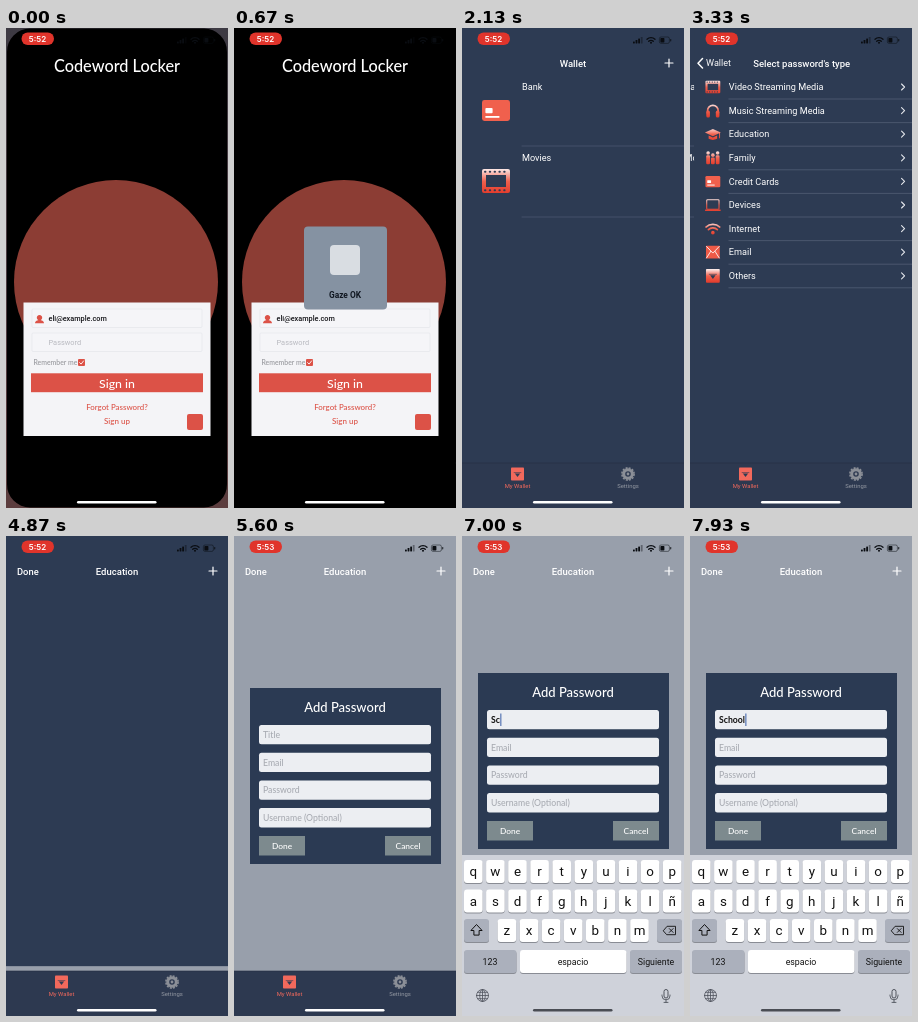
Animation of 222x480 px, one loop 8000 ms. Source, as an HTML page:

```html
<!DOCTYPE html>
<html lang="en">
<head>
<meta charset="utf-8">
<title>Codeword Locker</title>
<style>
html,body{margin:0;width:100%;height:100%;overflow:hidden;background:#000}
svg{display:block;width:100vw;height:100vh}
text{font-family:Roboto,sans-serif;font-size:9.15px;fill:#fff;white-space:pre}
.hand{font-family:Lato,sans-serif;font-weight:500}
.mid{text-anchor:middle}
.bold{font-weight:500}
</style>
</head>
<body>
<svg id="stage" viewBox="0 0 222 480" preserveAspectRatio="none"></svg>
<script>
const W = 222, H = 480, LOOP = 8000;
const NAVY = '#2d3b53', RED = '#dc5247', CORAL = '#f2695c';

// ---- markup helpers ----
const rect = (x, y, w, h, fill, r = 0, more = '') =>
  `<rect x="${x}" y="${y}" width="${w}" height="${h}" rx="${r}" fill="${fill}" ${more}/>`;
const text = (x, y, s, cls = '', style = '', id = '') =>
  `<text x="${x}" y="${y}" class="${cls}" style="${style}" ${id && `id="${id}"`}>${s}</text>`;
const line = (d, color, w = 1, more = '') =>
  `<path d="${d}" fill="none" stroke="${color}" stroke-width="${w}" stroke-linecap="round" stroke-linejoin="round" ${more}/>`;
const fill = (d, color) => `<path d="${d}" fill="${color}"/>`;
const group = (id, body, more = '') => `<g id="${id}" ${more}>${body}</g>`;
const at = (x, y, body, s = 1) => `<g transform="translate(${x} ${y}) scale(${s})">${body}</g>`;

// ---- icons, centred on 0,0 ----
const G = 'url(#warm)';
const walletIcon = c => rect(-6.5, -6.5, 13, 13, c, .8) +
  fill('M-2.6-.6h5.2L0 3Z', NAVY) + line('M-3.4-1.4h6.8', NAVY, .6);
const icons = {
  film: rect(-7, -6, 14, 12, G, 1) + rect(-5, -3, 10, 6, NAVY) +
    line('M-5.5-4.6h11M-5.5 4.6h11', NAVY, 1, 'stroke-dasharray=".2 2.2"'),
  phones: line('M-5 3v-3a5 5 0 0 1 10 0v3', G, 1.6) + rect(-6.2, 0, 3.4, 6.5, G, 1.5) + rect(2.8, 0, 3.4, 6.5, G, 1.5),
  cap: fill('M0-5 7.5-1.5 0 2-7.5-1.5Z', G) + fill('M-4 1.2 0 3 4 1.2V4.4Q0 6.6-4 4.4Z', G) + line('M6.3-1v4.5', G, .9),
  family: [-4.5, 0, 4.5].map((x, i) =>
    `<circle cx="${x}" cy="${i == 1 ? -2.5 : -4.5}" r="1.7" fill="${G}"/>` +
    rect(x - 1.8, i == 1 ? -.4 : -2.4, 3.6, i == 1 ? 6.6 : 8.6, G, 1.2)).join(''),
  card: rect(-7, -5, 14, 10.5, '#f0604d', 1.2) + rect(-5.3, -1, 3.6, 2.6, '#fff', .5) + rect(-5.3, 3, 7, .9, '#fff'),
  laptop: rect(-5.8, -5, 11.6, 9, 'none', .8, `stroke="${G}" stroke-width="1"`) + rect(-7.5, 4.2, 15, 1.5, G, .7),
  wifi: line('M-6.5-1.5a9.5 9.5 0 0 1 13 0M-4.2 1a6 6 0 0 1 8.4 0', G, 1.6) + `<circle cy="3.8" r="1.7" fill="${G}"/>`,
  mail: rect(-6.5, -6, 13, 12, '#ee5a47', .6) + line('M-6-5.4 0 .8 6-5.4M-6 5.4-2-.8M6 5.4 2-.8', '#fff', .8),
  wallet: walletIcon(G)
};
const cog = `<circle r="4.3" fill="none" stroke="#8b8f97" stroke-width="3"/><circle r="6.1" fill="none" stroke="#8b8f97" stroke-width="1.6" stroke-dasharray="2 1.19"/><circle r="1.4" fill="#8b8f97"/>`;
const plus = line('M203 35h8M207 31v8', '#fff', 1.2);

// ---- login page ----
const login = rect(0, 0, W, H, '#000') +
  text(111, 44, 'Codeword Locker', 'hand mid', 'font-size:16.3px') +
  '<circle cx="110" cy="254" r="102" fill="#8c3d34"/>' +
  rect(17.5, 274.5, 187, 133.5, '#f4f4f7') +
  [281, 305].map(y => rect(26, y, 170, 18.5, '#f5f5f8', 1, 'stroke="#e3e4ea" stroke-width=".6"')).join('') +
  at(33.5, 291, fill('M-4.5 4.2Q-4.3 1.6-1.2 1.2A2.7 2.7 0 1 1 1.2 1.2Q4.3 1.6 4.5 4.2Z', RED)) +
  text(42.5, 293, 'eli@example.com', 'bold', 'font-size:7.3px;fill:#16161a') +
  text(42.5, 317, 'Password', '', 'font-size:7.4px;fill:#b9bac0') +
  text(27.5, 337.3, 'Remember me', 'hand', 'font-size:6.9px;fill:#96979c') +
  rect(72, 331, 7, 7, RED, 1) + line('M73.6 334.6l1.5 1.5 2.5-3.2', '#fff', .9) +
  rect(25, 345.3, 172, 18.9, RED) +
  text(111, 359.5, 'Sign in', 'hand mid', 'font-size:12.3px') +
  text(111, 381.8, 'Forgot Password?', 'hand mid', `font-size:7.9px;fill:${RED}`) +
  text(111, 396.3, 'Sign up', 'hand mid', `font-size:8px;fill:${RED}`) +
  rect(181, 386, 16, 16, RED, 2);

// ---- wallet, type list and education pages ----
const page = rect(0, 0, W, H, NAVY);
const saved = [['card', 'Bank', 47], ['film', 'Movies', 118]];
const wallet = page + group('saved', saved.map(([k, s, y]) =>
  at(34, y + 35, icons[k], 2) + text(60, y + 15.3, s) + line(`M60 ${y + 71}H222`, '#53607a', .6)).join(''));

const types = [['film', 'Video Streaming Media'], ['phones', 'Music Streaming Media'], ['cap', 'Education'],
  ['family', 'Family'], ['card', 'Credit Cards'], ['laptop', 'Devices'], ['wifi', 'Internet'], ['mail', 'Email'], ['wallet', 'Others']];
const typeList = page + types.map(([k, s], i) => {
  const y = 59 + i * 23.6;
  return at(18.8, y, icons[k], 1.06) + text(34.8, y + 3.2, s) +
    line(`M207.5 ${y - 3}l3 3-3 3`, '#e4e7ec', 1.1) + line(`M34.8 ${y + 12}H222`, '#5d6980', .6);
}).join('');

// ---- add-password dialog ----
const fields = ['Title', 'Email', 'Password', 'Username (Optional)'];
const button = (x, s) => rect(x, 300, 46, 19.5, '#7d8a8e') + text(x + 23, 313, s, 'hand mid', 'font-size:8.4px');
const dialog = rect(16, 152, 191, 176, '#2b3a53') +
  text(111, 176.3, 'Add Password', 'hand mid', 'font-size:13px') +
  fields.map((s, i) => {
    const y = 189 + i * 27.7;
    return rect(25, y, 172, 19.3, '#eceef2', 2.5) +
      text(29, y + 12.9, s, 'hand', 'font-size:8.7px;fill:#a9acb3', i ? '' : 'hint');
  }).join('') +
  text(29, 201.9, '', 'hand', 'font-size:8.7px;font-weight:700;fill:#111', 'typed') +
  rect(29, 192.5, 1, 12.5, '#3b5fa8', 0, 'id="caret"') + button(25, 'Done') + button(151, 'Cancel');

// ---- navigation and tab bars ----
const title = (s, x = 111) => text(x, 38.5, s, 'mid bold', 'font-size:9.5px');
const navs =
  group('navWallet', title('Wallet') + plus) +
  group('navTypes', group('typesTitle', title("Select password's type", 110)) +
    line('M12.5 30.5 8 35.2l4.5 4.7', '#fff', 1.5) + text(16, 38.4, 'Wallet', '', 'font-size:9.1px')) +
  group('navEdu', group('eduTitle', title('Education')) + text(11, 38.5, 'Done', 'bold', 'font-size:9.4px') + plus);
const tabs = rect(0, 435, W, 45, '#2d3950') + line('M0 435H222', '#222d40', .6) +
  at(55.5, 446, walletIcon(CORAL)) + at(166, 446, cog) +
  text(55.5, 460, 'My Wallet', 'mid', `font-size:5.9px;fill:${CORAL}`) +
  text(166, 460, 'Settings', 'mid', 'font-size:5.9px;fill:#959aa3');

// ---- keyboard, drawn with its top at 0 ----
const key = (x, y, w, c, more = '') => rect(x, y + 1, w, 23, '#898c94', 3) + rect(x, y, w, 23, c, 3, more);
const rows = [['QWERTYUIOP', 2, 5], ['ASDFGHJKLÑ', 2, 34.5], ['ZXCVBNM', 35.6, 64]];
const GREY = '#abb0bc';
const keyboard = rect(0, 0, W, 161, '#cfd2da') +
  rows.map(([s, x, y]) => [...s].map((c, i) =>
    key(x + i * 22.1, y, 18.6, '#fff') +
    text(x + 9.3 + i * 22.1, y + 16.4, c, 'mid letter', 'font-size:13.4px;fill:#111')).join('')).join('') +
  key(2, 64, 25, GREY, 'id="shiftKey"') +
  '<path id="shift" d="M14.5 69.5l5.6 6h-3v4.6h-5.2v-4.6h-3Z" stroke="#111" stroke-width="1" stroke-linejoin="round"/>' +
  key(195, 64, 25, GREY) + line('M201.5 75.5l3.6-4.2h8.4v8.4h-8.4ZM207.3 73.6l3.8 3.8M211.1 73.6l-3.8 3.8', '#111', .9) +
  key(2, 95, 52.5, GREY) + key(58, 95, 106.5, '#fff') + key(168, 95, 52, GREY) +
  text(28, 109.6, '123', 'mid', 'font-size:8.8px;fill:#111') +
  text(111, 109.6, 'espacio', 'mid', 'font-size:8.8px;fill:#111') +
  text(194, 109.6, 'Siguiente', 'mid', 'font-size:8.8px', 'next') +
  at(20.5, 140.5, line('M-6 0a6 6 0 1 0 12 0a6 6 0 1 0-12 0M-6 0H6M0-6V6M-2.8 0a2.8 6 0 1 0 5.6 0a2.8 6 0 1 0-5.6 0M-5-3.2H5M-5 3.2H5', '#50545d', .8)) +
  at(204, 141, rect(-2, -6.5, 4, 8.5, 'none', 2, 'stroke="#50545d"') + line('M-4-1v.8a4 4 0 0 0 8 0V-1M0 4v2.4M-2 6.4h4', '#50545d', .9));

// ---- face check panel, window corners, status bar ----
const panel = rect(70, 198.5, 83, 83, '#8592a2', 4) +
  rect(96, 217, 30, 30, '#fff', 4, 'id="glyph"') +
  line('M111.5 214a18 18 0 1 1-.01 0', '#fff', 1.8, 'id="ring" pathLength="1" stroke-dasharray="1 2"') +
  line('M103.5 232.5l5.5 5 9-10', '#fff', 1.7, 'id="tick" pathLength="1" stroke-dasharray="1 2"') +
  text(111, 270, 'Gaze OK', 'mid', 'font-size:8.4px;font-weight:700;fill:#111822');
const corners = `<path fill="url(#behind)" fill-rule="evenodd" d="M0 0H222V480H0Z
  M24 .5H198A23 23 0 0 1 221 24V456A23 23 0 0 1 198 479.5H24A23 23 0 0 1 1 456V24A23 23 0 0 1 24 .5Z"/>`;
const status = rect(15.5, 4.5, 32.5, 12.5, '#e0342b', 6.2) +
  text(31.5, 13.7, '5:52', 'mid', 'font-family:Inter,sans-serif;font-size:8px;font-weight:600', 'clock') +
  [0, 1, 2, 3].map(i => rect(171 + i * 2.6, 13.5 - i * 1.5, 1.8, 2 + i * 1.5, i < 3 ? '#0a0d12' : '#0a0d1266', .4)).join('') +
  at(189, 12.5, line('M-4-1.2a5.8 5.8 0 0 1 8 0M-2.3.8a3.2 3.2 0 0 1 4.6 0', '#0a0d12', 1.3) + '<circle cy="2.3" r="1" fill="#0a0d12"/>') +
  rect(197.4, 9, 10, 6.4, 'none', 1.6, 'stroke="#0a0d12" stroke-opacity=".6" stroke-width=".8"') +
  rect(198.4, 10, 4, 4.4, '#0a0d12', .7) + rect(208.3, 11, .9, 2.4, '#0a0d12', .4);

const stage = document.getElementById('stage');
stage.innerHTML =
  '<defs><linearGradient id="warm" gradientUnits="userSpaceOnUse" x1="0" y1="-7" x2="0" y2="6"><stop stop-color="#fff"/><stop offset=".55" stop-color="#f0604d"/><stop offset="1" stop-color="#e33d2d"/></linearGradient>' +
  '<linearGradient id="behind" x2="0" y2="1"><stop stop-color="#3d3a43"/><stop offset="1" stop-color="#5c3d3e"/></linearGradient></defs>' +
  group('login', login) + group('app',
    group('wallet', wallet) + group('types', typeList) + group('edu', page) +
    group('cover', rect(0, 0, W, H, '#fff', 0, 'fill-opacity=".51"') + group('dialog', dialog)) +
    navs + tabs) +
  group('panel', panel) + group('keys', keyboard) + group('corners', corners) + status +
  rect(71, 473, 79.5, 2.6, '#fff', 1.3, 'id="home"');

const el = {};
stage.querySelectorAll('[id]').forEach(n => el[n.id] = n);
const letters = [...stage.querySelectorAll('.letter')];

// ---- motion ----
const ramp = (t, a, b) => Math.min(1, Math.max(0, (t - a) / (b - a)));
// critically damped spring, settled after about 600 ms
const spring = (t, start) => {
  const k = Math.max(0, t - start) * .016;
  return k > 10 ? 1 : 1 - (1 + k) * Math.exp(-k);
};
const move = (n, x, y = 0) => n.setAttribute('transform', `translate(${x.toFixed(2)} ${y.toFixed(2)})`);
const fade = (n, o) => {
  n.setAttribute('opacity', o.toFixed(3));
  n.style.display = o > .001 ? '' : 'none';
};
const dash = (n, p) => {
  n.setAttribute('stroke-dashoffset', 1 - p);
  fade(n, p > 0 ? 1 : 0);
};
const set = (n, s) => { if (n.textContent !== s) n.textContent = s; };
const WORD = 'School', STROKES = [6600, 6830, 7080, 7330, 7550, 7780];

function draw(t) {
  // the app window has just finished opening
  fade(el.corners, t < 70 ? 1 : 0);

  // page pushes: the covered page trails at 30 %
  const enter = spring(t, 1033), list = spring(t, 2960), edu = spring(t, 4060);
  move(el.login, -.3 * W * enter);
  move(el.app, W * (1 - enter));
  fade(el.login, enter < 1 ? 1 : 0);
  fade(el.saved, ramp(t, 1600, 1700));
  move(el.wallet, -.3 * W * list);
  move(el.types, W * (1 - list) - .3 * W * edu);
  move(el.edu, W * (1 - edu));

  fade(el.navWallet, 1 - ramp(list, 0, .7));
  fade(el.navTypes, list * (1 - ramp(edu, 0, .7)));
  fade(el.navEdu, edu);
  move(el.navWallet, -50 * list);
  move(el.typesTitle, 90 * (1 - list) - 50 * edu);
  move(el.eduTitle, 90 * (1 - edu));

  // face check
  fade(el.panel, ramp(t, 200, 330) * (1 - ramp(t, 1330, 1530)));
  fade(el.glyph, 1 - ramp(t, 640, 740));
  dash(el.ring, ramp(t, 680, 900));
  dash(el.tick, ramp(t, 880, 1020));

  // dialog and keyboard
  move(el.cover, 0, H * (1 - spring(t, 4837)));
  const up = 1 - (1 - ramp(t, 5730, 6130)) ** 4;
  move(el.dialog, 0, -15 * up);
  move(el.keys, 0, H - 161 * up);
  fade(el.keys, up > 0 ? 1 : 0);

  const n = STROKES.filter(s => t >= s).length;
  set(el.typed, WORD.slice(0, n));
  fade(el.hint, n ? 0 : 1);
  fade(el.caret, up > 0 ? 1 : 0);
  move(el.caret, n ? el.typed.getComputedTextLength() + .4 : 0);
  letters.forEach(l => set(l, n ? l.textContent.toLowerCase() : l.textContent.toUpperCase()));
  el.shiftKey.setAttribute('fill', n ? GREY : '#fff');
  el.shift.setAttribute('fill', n ? 'none' : '#111');
  el.next.style.fill = n ? '#111' : '#858b98';

  set(el.clock, t < 5270 ? '5:52' : '5:53');
  el.home.setAttribute('fill', up > .05 ? '#4a4d54' : t > 1060 && t < 1450 ? '#8d8a92' : '#fff');
}

const t0 = performance.now();
function tick() {
  draw((performance.now() - t0) % LOOP);
  requestAnimationFrame(tick);
}
tick();
</script>
</body>
</html>
```
